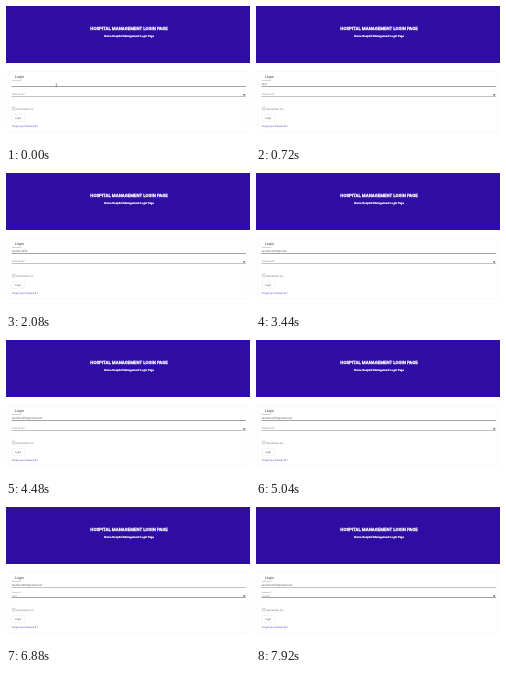
These frames come from a looping animation (244x139 px, 8000 ms). An HTML page:

```html
<!DOCTYPE html>
<html lang="en">
<head>
<meta charset="utf-8">
<title>Login form</title>
<style>
html, body { margin: 0; width: 100%; height: 100%; overflow: hidden; background: #fff; }
svg { display: block; width: 100%; height: 100%; font-family: Roboto, sans-serif; fill: #555; }
.heading { fill: #fff; stroke: #fff; text-anchor: middle; font-weight: 500; }
.label { fill: #888; }
.value { font-size: 2.95px; fill: #666; }
</style>
</head>
<body>
<svg viewBox="0 0 244 139" text-rendering="geometricPrecision">
  <rect width="244" height="139" fill="#fff"/>
  <rect width="244" height="57" fill="#2f0da5"/>
  <text class="heading" x="123" y="24.2" font-size="4.4" stroke-width=".3">HOSPITAL MANAGEMENT LOGIN PAGE</text>
  <text class="heading" x="123" y="31.3" font-size="2.75" stroke-width=".18">Home Hospital Management Login Page</text>

  <rect x="2" y="65.5" width="240" height="60.5" fill="none" stroke="#f1f1f1" stroke-width=".5"/>
  <text x="8.8" y="71.5" font-size="3.75" fill="#444">Login</text>

  <text class="label" x="5.7" y="75.4" font-size="2">Username *</text>
  <text class="value" id="username" x="5.7" y="79.2"></text>
  <line id="userLine" x1="5.5" x2="240" y1="80.5" y2="80.5"/>

  <text class="label" id="passLabel" x="5.7">Password *</text>
  <g id="dots" fill="#666"></g>
  <line id="passLine" x1="5.5" x2="240" y1="90.5" y2="90.5"/>
  <ellipse cx="238.2" cy="88.9" rx="1.2" ry=".8" fill="#777"/>

  <rect x="6.4" y="101.3" width="2.7" height="2.7" rx=".7" fill="#fff" stroke="#999" stroke-width=".5"/>
  <text x="10.5" y="103.7" font-size="2.6" fill="#777">Remember me</text>
  <rect x="6" y="108.4" width="12.5" height="7" rx=".6" fill="#fff" stroke="#e8e8e8" stroke-width=".5"/>
  <text x="9" y="113" font-size="2.5">Login</text>
  <text x="5.8" y="121.4" font-size="2.5" fill="#4b3bdc">Forgot your Password ?</text>

  <path id="pointer" d="M49.6 77.8h1.6M50.4 77.8v3M49.6 80.8h1.6" fill="none" stroke="#555" stroke-width=".4"/>
</svg>
<script>
const LOOP = 8000, PASSWORD_FOCUS = 5200;
const EMAIL = "testdem456@node.test";
const emailKeys = [160, 320, 480, 720, 880, 1200, 1440, 1760, 1920, 2080,
  2640, 2960, 3040, 3120, 3200, 3360, 3680, 3920, 4240, 4480];
const passwordKeys = [5600, 5920, 6240, 6560, 6880, 7120, 7440, 7920];

const get = id => document.getElementById(id);
const pressed = (keys, t) => keys.filter(key => key <= t).length;

const dots = passwordKeys.map((_, i) => {
  const dot = document.createElementNS("http://www.w3.org/2000/svg", "circle");
  dot.setAttribute("cx", 6.4 + i);
  dot.setAttribute("cy", 89);
  dot.setAttribute("r", .38);
  get("dots").append(dot);
  return dot;
});

function styleLine(line, focused) {
  line.setAttribute("stroke", focused ? "#999" : "#aaa");
  line.setAttribute("stroke-width", focused ? .9 : .7);
}

function render(t) {
  const inPassword = t >= PASSWORD_FOCUS;
  get("username").textContent = EMAIL.slice(0, pressed(emailKeys, t));
  const dotCount = pressed(passwordKeys, t);
  dots.forEach((dot, i) => dot.setAttribute("visibility", i < dotCount ? "visible" : "hidden"));

  styleLine(get("userLine"), !inPassword);
  styleLine(get("passLine"), inPassword);

  // The empty label shrinks upward when its field gains focus.
  const lift = Math.min(1, Math.max(0, (t - PASSWORD_FOCUS) / 160));
  get("passLabel").setAttribute("y", 89.4 - 3.4 * lift);
  get("passLabel").setAttribute("font-size", 2.6 - .6 * lift);
  get("pointer").setAttribute("visibility", t < 240 ? "visible" : "hidden");
}

const start = performance.now();
function frame() {
  render((performance.now() - start) % LOOP);
  requestAnimationFrame(frame);
}
frame();
</script>
</body>
</html>
```
